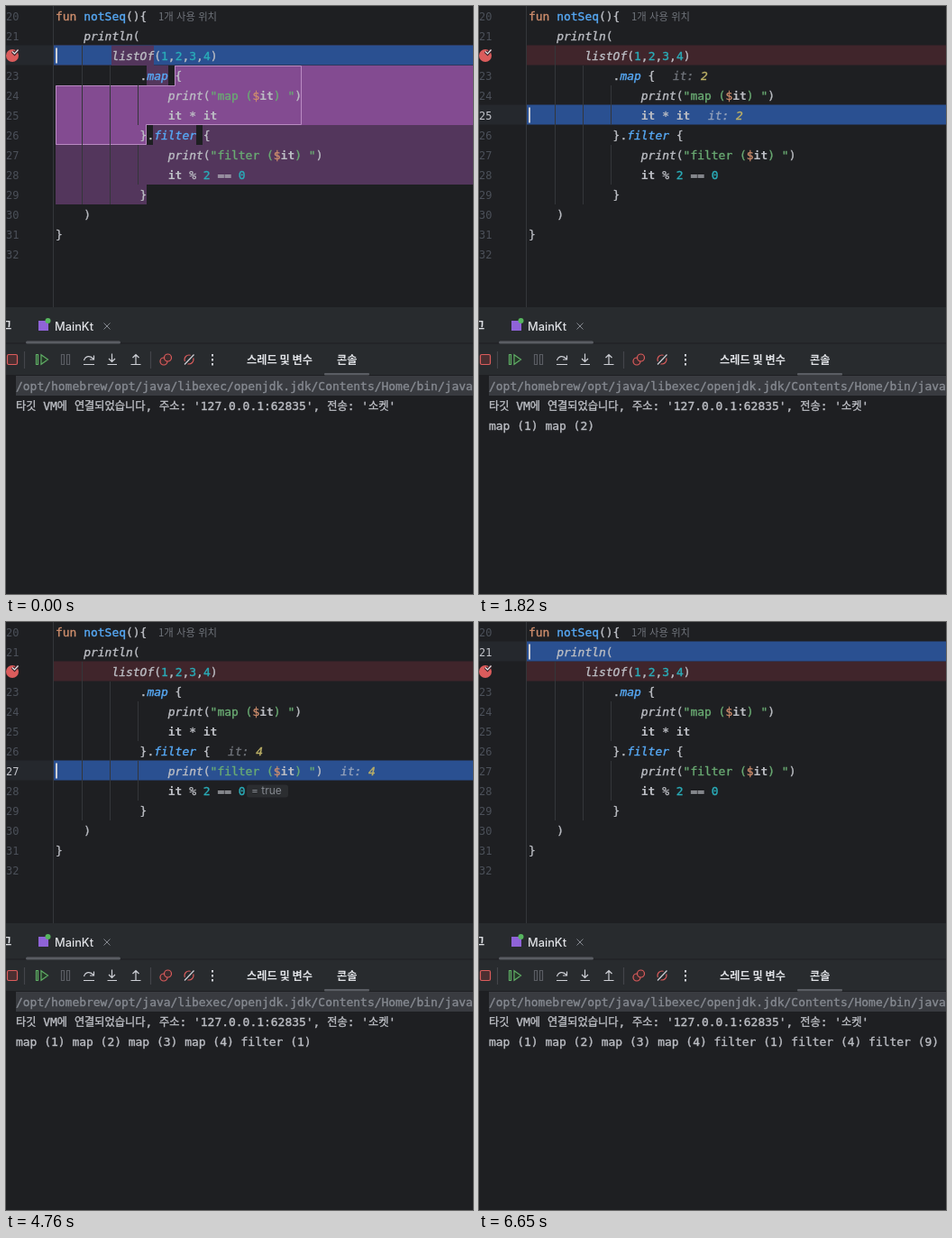
Write an HTML page that moves like this. It is 518 px wide and 652 px high and loops after 6.93 s.

```html
<!DOCTYPE html>
<html lang="ko">
<head>
<meta charset="utf-8">
<title>notSeq debug session</title>
<style>
html, body { margin: 0; width: 100%; height: 100%; overflow: hidden; background: #1e1f22; }
svg { display: block; width: 518px; height: 652px; }
text { white-space: pre; color: #bcbec4; font: 12.96px "DejaVu Sans Mono", "Noto Sans CJK KR", monospace; }
text, tspan { fill: currentColor; stroke: currentColor; stroke-width: .35; }
.k { color: #cf8e6d; }
.f, .x { color: #57aaf7; }
.x, .c, .hint { font-style: italic; }
.s { color: #6aab73; }
.n { color: #2aacb8; }
.b { font-weight: bold; stroke-width: 0; }
.num { font-size: 11.96px; color: #4b5059; stroke-width: 0; }
.num.on { color: #c2c4ca; }
.hint { color: #6f737a; }
.hint.lit { color: #92a0ba; }
.hint .new { color: #bdb066; }
.ko { font-family: "Noto Sans CJK KR", sans-serif; font-size: 12.2px; }
.ui { font-family: Inter, "Noto Sans CJK KR", sans-serif; font-weight: 500; color: #dfe1e5; stroke-width: 0; }
.small { font-size: 11.4px; color: #6f737a; stroke-width: 0; }
.tab { font-size: 12.2px; font-weight: 700; }
.line { fill: none; stroke-width: 1.2; }
.thin { fill: none; stroke-width: 1; }
#bar { --go: #5fad65; --goFill: #253627; --pause: #5a5d63; --step: #ced0d6; }
#bar.run { --go: #6f737a; --goFill: #6f737a; --pause: #ced0d6; --step: #5a5d63; }
</style>
</head>
<body>
<svg viewBox="0 0 518 652">
  <rect width="518" height="652" fill="#1e1f22"/>
  <rect id="gutter" width="52" height="22" fill="#25282d"/>
  <rect x="53" y="43.5" width="465" height="22" fill="#40252b"/>
  <rect id="caretRow" x="53" y="131.5" width="465" height="22" fill="#25282d"/>
  <rect id="exec" height="22" fill="#2a5091"/>
  <g id="targets">
    <path fill="#53365c" d="M117 44H164V66H117ZM156 66H180V88H156ZM163 132H211V154H163ZM218 132H518V198H156V220H55V154H218Z"/>
    <path fill="#834b91" d="M187 66H518V132H156V154H55V88H187Z"/>
    <path class="thin" stroke="#b98ac2" d="M187.5 66.5H327.5V131.5H155.5V153.5H55.5V88.5H187.5Z"/>
  </g>
  <path class="thin" stroke="#34363a" d="M52.5 0V334M84.5 44V220M115.5 66V220M146.5 88V132M146.5 154V198"/>
  <g id="braces">
    <path fill="#43454a" d="M187 66h8.5v22h-8.5zM148 132h8.5v22h-8.5z"/>
    <path class="thin" stroke="#6f737a" d="M146.5 88V132"/>
  </g>
  <g id="code"></g>
  <text x="169" y="15.5" class="ko small">1개 사용 위치</text>
  <g id="inlay">
    <rect x="267" y="180.5" width="46" height="14" rx="3" fill="#2b2d30"/>
    <text class="ui" x="272" y="191" style="font-size:12px;font-weight:400;color:#868a91"></text>
  </g>
  <text id="headHint" class="hint"></text>
  <text id="lineHint" class="hint lit"></text>
  <circle cx="7" cy="55" r="7" fill="#db5c5c"/>
  <path class="line" stroke="#40252b" style="stroke-width:3.5" d="M7 50.5l2.500 2.500 4-4.500"/>
  <path class="line" stroke="#e6e7ea" d="M7 50.5l2.500 2.500 4-4.500"/>
  <rect id="caret" x="55" width="2" height="17" fill="#ced0d6"/>

  <rect y="334" width="518" height="75" fill="#282b2e"/>
  <rect y="373.5" width="518" height="1" fill="#1e1f22"/>
  <text class="ui tab" x="-5" y="359">그</text>
  <rect x="36" y="349" width="11" height="11" fill="#8f63d8"/>
  <circle cx="46.5" cy="349" r="3" fill="#57b55f"/>
  <text class="ui" x="54" y="359.5" style="font-size:12.8px">MainKt</text>
  <path class="thin" stroke="#868a91" d="M108.500 351.500l7 7m0-7l-7 7"/>
  <rect x="22" y="371.5" width="105" height="3" rx="1.5" fill="#5a5d63"/>
  <g id="bar" class="line">
    <rect x="1.5" y="386.5" width="11" height="11" rx="1.5" fill="#4b2f31" stroke="#db5c5c"/>
    <path stroke="#43454a" d="M20.500 383V402M160.500 383V402"/>
    <path style="stroke:var(--go);fill:var(--goFill)" d="M33.500 386.500h2v11h-2zM39 386.700L46.500 392 39 397.300z"/>
    <path style="stroke:var(--pause)" d="M61.500 386.500h3v11h-3zM67.500 386.500h3v11h-3z"/>
    <path style="stroke:var(--step)" d="M86.500 393C88 388 93.500 387 97 391.500M97.500 387.500V392H93M86 397.500H98
      M117.500 385.500V394.500M114 391l3.500 3.500 3.500-3.500M112.500 397.500H123
      M144 397.500V386.500M140.500 390l3.500-3.500 3.500 3.500M138.500 397.500H149.500"/>
    <circle cx="175" cy="394" r="4" fill="#3a2a2c" stroke="#db5c5c"/>
    <circle cx="179.500" cy="390" r="4" fill="#3a2a2c" stroke="#db5c5c"/>
    <circle cx="203" cy="392" r="5" stroke="#db5c5c"/>
    <path stroke="#282b2e" style="stroke-width:4" d="M198 397.500L208.500 386.500"/>
    <path stroke="#ced0d6" d="M198 397.500L208.500 386.500"/>
    <path fill="#ced0d6" d="M228 386h2v2.400h-2zM228 391h2v2.400h-2zM228 396h2v2.400h-2z"/>
  </g>
  <text class="ui tab" x="267" y="396.5">스레드 및 변수</text>
  <text class="ui tab" x="367" y="396.5">콘솔</text>
  <rect x="353" y="407" width="50" height="2.5" rx="1" fill="#5a5d63"/>

  <rect x="11" y="410" width="507" height="22" fill="#393b40"/>
  <text x="11" y="426" style="color:#868a91">/opt/homebrew/opt/java/libexec/openjdk.jdk/Contents/Home/bin/java</text>
  <text id="attached" x="11" y="448"></text>
  <text id="out" x="11" y="470"></text>
</svg>
<script>
const FIRST = 20, ROW = 22, LEFT = 55, CHAR = 7.8, LOOP = 6930;
const $ = id => document.getElementById(id);
const rowY = line => (line - FIRST) * ROW;
const colX = col => LEFT + col * CHAR;
const show = (id, on) => $(id).style.display = on ? '' : 'none';
const place = (id, attrs) => {
  for (const name in attrs) $(id).setAttribute(name, attrs[name]);
};

// [indent, text]; [k:word] gives a word its colour class
const CODE = [
  [0, '[k:fun] [f:notSeq](){'],
  [4, '[c:println]('],
  [8, '[c:listOf]([n:1],[n:2],[n:3],[n:4])'],
  [12, '.[x:map] {'],
  [16, '[c:print]([s:"map (][k:$][b:it][s:) "])'],
  [16, '[b:it] * [b:it]'],
  [12, '}.[x:filter] {'],
  [16, '[c:print]([s:"filter (][k:$][b:it][s:) "])'],
  [16, '[b:it] % [n:2] == [n:0]'],
  [12, '}'],
  [4, ')'],
  [0, '}'],
  [0, '']
];
const TOKEN = /\[(\w):(.*?)\]/g;
const endCol = line => {
  const [indent, text] = CODE[line - FIRST];
  return indent + text.replace(TOKEN, '$2').length;
};

$('code').innerHTML = CODE.map(([indent, text], i) => {
  const line = FIRST + i, y = i * ROW + 16;
  const body = text.replace(TOKEN, '<tspan class="$1">$2</tspan>');
  const num = line === 22 ? '' : `<text class="num" data-line="${line}" x="0" y="${y}">${line}</text>`;
  return `${num}<text x="${colX(indent)}" y="${y}">${body}</text>`;
}).join('');

$('attached').innerHTML = "타깃 VM에 연결되었습니다, 주소: '127.0.0.1:62835', 전송: '소켓'"
  .replace(/[가-힣]+/g, '<tspan class="ko">$&</tspan>');

const OUTPUT = ['map (1) ', 'map (2) ', 'map (3) ', 'map (4) ', 'filter (1) ', 'filter (4) ', 'filter (9) '];

// Each step lists only what changes
const STEPS = [
  [0, { line: 22, it: 0, out: 0, run: false, pick: true }],
  [350, { run: true, pick: false }],
  [560, { line: 24, it: 1 }],
  [630, { run: false }],
  [840, { run: true }],
  [910, { line: 25, run: false }],
  [1120, { out: 1 }],
  [1260, { run: true }],
  [1330, { line: 24, it: 2, run: false }],
  [1610, { line: 25 }],
  [1820, { out: 2 }],
  [2030, { line: 24, it: 3 }],
  [2380, { line: 25 }],
  [2590, { out: 3 }],
  [2800, { run: true }],
  [2870, { line: 24, it: 4, run: false }],
  [3220, { line: 25 }],
  [3430, { out: 4 }],
  [3640, { line: 26, it: 0 }],
  [4060, { run: true }],
  [4130, { line: 27, it: 1, run: false }],
  [4410, { line: 28 }],
  [4620, { out: 5 }],
  [4760, { line: 27, it: 4 }],
  [5110, { line: 28 }],
  [5320, { out: 6 }],
  [5390, { line: 27, it: 9 }],
  [5670, { run: true }],
  [5740, { line: 28, run: false }],
  [5950, { out: 7 }],
  [6020, { line: 27, it: 16 }],
  [6300, { line: 28 }],
  [6580, { run: true }],
  [6650, { line: 21, it: 0, run: false }]
];
let last = {};
const STATES = STEPS.map(([at, change]) => last = { ...last, ...change, at });

function hint(id, line, it, shift = 0) {
  show(id, it);
  place(id, { x: colX(endCol(line) + 2.5) + shift, y: rowY(line) + 16 });
  $(id).innerHTML = `it: <tspan class="${it > 1 ? 'new' : ''}">${it}</tspan>`;
}

function render({ line, it, out, run, pick }) {
  const y = rowY(line) - .5, closing = line === 26, filtering = line === 27 || line === 28;
  place('gutter', { y });
  place('caret', { y: y + 3 });
  place('exec', { y, x: closing ? 55 : 53, width: closing ? 93 : 465 });
  show('exec', line !== 22 || !run);
  show('targets', pick);
  show('caretRow', closing);
  show('braces', closing);
  show('inlay', filtering);
  const result = it % 2 === 0, [pill, label] = $('inlay').children;
  pill.setAttribute('width', result ? 46 : 50);
  label.textContent = '= ' + result;
  hint('headHint', filtering ? 26 : 23, it);
  hint('lineHint', line, it, line === 28 ? 48 : 0);
  document.querySelectorAll('.num').forEach(n => n.classList.toggle('on', +n.dataset.line === line));
  $('bar').classList.toggle('run', run);
  $('out').textContent = OUTPUT.slice(0, out).join('');
}

let current;
const start = performance.now();
function tick() {
  const t = (performance.now() - start) % LOOP;
  const state = STATES.filter(s => s.at <= t).pop();
  if (state !== current) render(current = state);
  requestAnimationFrame(tick);
}
tick();
</script>
</body>
</html>
```
